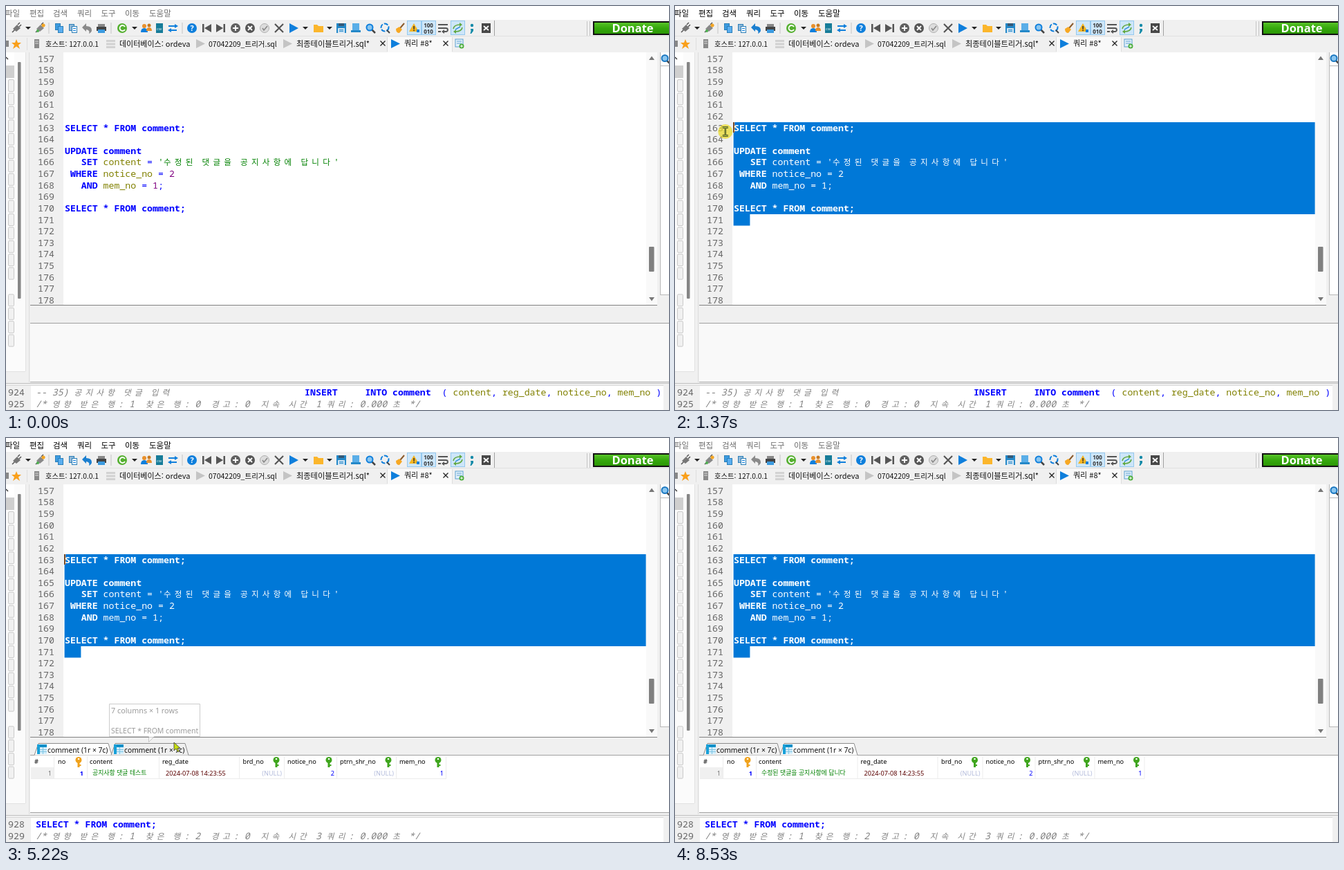
Recreate the animation shown at these times as an HTML page. Size 959 px wide and 584 px high, loop 8.59 s.

```html
<!DOCTYPE html>
<html lang="ko">
<head>
<meta charset="utf-8">
<title>SQL editor</title>
<style>
html, body { margin: 0; width: 100%; height: 100%; overflow: hidden; background: #f0f0f0; }
svg { display: block; width: 959px; height: 584px; }
text { white-space: pre; font-family: "Noto Sans", "Noto Sans CJK KR", "Noto Sans CJK", sans-serif; }
.m { font: 13.23px "Noto Sans Mono", "DejaVu Sans Mono", monospace; }
.h { font: 11.6px "Noto Sans CJK KR", "Noto Sans CJK", sans-serif; }
.ko { font-family: "Noto Sans CJK KR", "Noto Sans CJK", sans-serif; }
.k { fill: #0000ff; font-weight: bold; }
.o { fill: #0000ff; }
.i { fill: #808000; }
.s { fill: #008000; }
.n { fill: #800080; }
.c { fill: #808080; font-style: italic; }
.g { fill: #666; }
.white text { fill: #fff; }
</style>
</head>
<body>
<svg id="stage" viewBox="0 0 959 584"></svg>
<script>
const LOOP = 8590, CW = 7.94, LH = 16.62, X0 = 85;

const rect = (x, y, w, h, f, more = '') => `<rect x="${x}" y="${y}" width="${w}" height="${h}" fill="${f}" ${more}/>`;
const circ = (x, y, r, f, more = '') => `<circle cx="${x}" cy="${y}" r="${r}" fill="${f}" ${more}/>`;
const fill = (d, f) => `<path d="${d}" fill="${f}"/>`;
const line = (d, s, w = 1) => `<path d="${d}" fill="none" stroke="${s}" stroke-width="${w}"/>`;
const text = (x, y, s, size, f = '#000', more = '') => `<text x="${x}" y="${y}" font-size="${size}" fill="${f}" ${more}>${s}</text>`;
const group = (id, s, more = '') => `<g id="${id}" ${more}>${s}</g>`;
const END = 'text-anchor="end"';

// Text on a character grid; Hangul takes two cells.
const isKo = ch => /[가-힣]/.test(ch);
const cellCount = s => [...s].reduce((n, ch) => n + (isKo(ch) ? 2 : 1), 0);
function cells(x, y, s, cls) {
  let col = 0;
  return s.match(/[가-힣]+|[^가-힣]+/g).map(run => {
    const ko = isKo(run[0]);
    const xs = [...run].map(() => { const p = x + col * CW; col += ko ? 2 : 1; return p.toFixed(1); });
    return `<text class="${ko ? 'h' : 'm'} ${cls}" x="${xs.join(' ')}" y="${y}">${run}</text>`;
  }).join('');
}
function runs(x, y, parts) {
  let col = 0;
  return parts.map(([cls, s]) => {
    const out = cells(x + col * CW, y, s, cls);
    col += cellCount(s);
    return out;
  }).join('');
}

const TOP = 68.25;
const rowTop = n => TOP + (n - 157) * LH;
const baseline = n => (80.8 + (n - 157) * LH).toFixed(1);

const select = [['k', 'SELECT * FROM comment;']];
const code = {
  163: select,
  165: [['k', 'UPDATE comment']],
  166: [['k', '   SET '], ['i', 'content'], ['o', ' = '], ['s', "'수정된 댓글을 공지사항에 답니다'"]],
  167: [['k', ' WHERE '], ['i', 'notice_no'], ['o', ' = '], ['n', '2']],
  168: [['k', '   AND '], ['i', 'mem_no'], ['o', ' = '], ['n', '1'], ['o', ';']],
  170: select,
  171: [['o', '   ']]
};
const rowLength = n => (code[n] || []).reduce((sum, p) => sum + cellCount(p[1]), 0);
const codeText = Object.keys(code).map(n => runs(X0, baseline(n), code[n])).join('');

function toolbar() {
  const B = '#0f7fdc', D = '#555', out = [];
  const add = (...s) => out.push(...s);
  const drop = x => fill(`M${x - 4} 30h8l-4 4z`, '#222');
  const sep = x => line(`M${x} 24v16`, '#c4c4c4');
  const plug = (x, c) => line(`M${x - 6} 38l4-4M${x + 2} 27l3-3M${x + 4} 30l3-3`, D, 1.5) + fill(`M${x - 5} 33l6-6 5 5-6 5z`, c);
  const sheet = (x, y, c) => rect(x, y, 7, 9, c, 'stroke="#2c7fb8"');
  add(plug(15, '#777'), drop(32), plug(49, '#888'), circ(54, 28, 2.5, '#f5a623'), circ(46, 36, 2, '#4caf50'), sep(62));
  add(sheet(71.5, 25.5, '#3c9be0'), sheet(75.5, 29.5, '#5aaef0'), sheet(91.5, 26.5, '#8fb8d8'), sheet(95.5, 29.5, '#fff'), line('M97 32.5h4M97 35.5h4', B));
  add(`<path id="undo" d="M110 31l6-6v4q8 0 8 6 0 3-4 5 2-5-4-6v3z"/>`);
  add(rect(133, 26, 10, 4, '#888'), rect(131, 30, 14, 6, '#444'), rect(133, 34, 10, 5, '#3c9be0'), sep(152));
  add(circ(168, 32, 7, '#55b030'), line('M172 30a4 4 0 1 0 0 4', '#fff', 1.8), drop(186));
  add(circ(200, 29, 3, '#e8912d'), fill('M195 38q0-6 5-6t5 6z', B), circ(207, 28, 2.5, '#c97a20'), fill('M203 36q0-5 4-5t4 5z', '#e8912d'));
  add(rect(217, 25, 10, 14, '#167c99'), text(218, 35, 'csv', 5, '#fff'), line('M235 29h11M236 35h11', B, 2), fill('M244 26l5 3-5 3z', B), fill('M239 32l-5 3 5 3z', B), sep(255));
  add(circ(269, 32, 7, B), text(269, 36, '?', 11, '#fff', 'text-anchor="middle" font-weight="bold"'));
  add(rect(284, 26, 2.5, 12, D), fill('M297 26v12l-10-6z', D), rect(314.5, 26, 2.5, 12, D), fill('M304 26v12l10-6z', D));
  add(circ(332, 32, 7, '#606060'), line('M328 32h8M332 28v8', '#fff', 2), circ(353, 32, 7, D), line('M350 29l6 6M356 29l-6 6', '#fff', 2));
  add(circ(374, 32, 6.5, '#ddd', 'stroke="#b0b0b0"'), line('M371 32l2 3 5-6', '#888', 1.6), line('M389 26l12 12M401 26l-12 12', D, 2.2));
  add(fill('M410 25v14l13-7z', B), drop(433), fill('M445 27h5l2 2h7v9h-14z', '#fbb62c'), drop(468));
  add(rect(478, 25, 14, 14, '#2488c8'), rect(481, 25, 8, 4, '#355a78'), rect(480, 32, 10, 7, '#cfe4f4'), line('M482 34.5h6M482 36.5h6', '#2488c8'));
  add(rect(501, 25, 10, 11, '#5aaee8'), rect(499, 35, 14, 3, '#2488c8'));
  add(line('M529 34l5 5', '#444', 2.5), circ(526, 31, 4.5, '#8ac6f0', `stroke="${B}" stroke-width="2"`));
  add(`<circle cx="548" cy="31" r="5.5" fill="none" stroke="${B}" stroke-width="2" stroke-dasharray="6 2"/>`, line('M551 35l4 4', '#444', 2));
  add(line('M576 25l-6 7', '#8a5a2b', 2), fill('M564 33l5-3 4 4-4 5q-5 0-5-6z', '#f7a823'));
  for (const x of [580, 601, 643]) add(rect(x + .5, 21.5, 20, 20, '#cde6f9', 'stroke="#94c8ee"'));
  add(fill('M590 25l7 12h-14z', '#f6b521'), rect(589.3, 29, 1.6, 4.5, '#333'), rect(589.3, 34.5, 1.6, 1.6, '#333'), rect(594, 34, 4, 4, B));
  for (const [y, s] of [[31, '100'], [39.5, '010']]) add(text(611, y, s, 8, '#333', 'text-anchor="middle" font-weight="bold"'));
  add(line('M625 27h14M625 32h11q3 0 3 2.5t-3 2.5h-4M625 37h4', D, 1.8), fill('M634 34v6l-4-3z', D));
  add(line('M647 33q1-6 10-6M660 31q-1 6-10 6', '#62a840', 1.6), fill('M656 24l4 3-4 3z', '#62a840'), fill('M651 34l-4 3 4 3z', '#62a840'), line('M650 34l7-4', B, 1.3));
  add(circ(674, 28, 2.2, '#128aa8'), fill('M672 33h4v3l-3 4h-1.5l1-4z', '#128aa8'));
  add(rect(688, 25, 13, 14, '#484848'), line('M691 29l7 6M698 29l-7 6', '#fff', 1.8), line('M706.5 21v22', '#a0a0a0'));
  return out.join('');
}

function tabBar() {
  const close = x => line(`M${x - 3.5} 50.5l7 7M${x + 3.5} 50.5l-7 7`, '#222', 1.3);
  const play = (x, c) => fill(`M${x - 6} 48v13l13-6.5z`, c);
  const ko = 'class="ko"';
  return rect(552, 45, 93, 22, '#f9f9f9') + line('M551.5 45v21M645.5 45v21', '#ddd')
    + rect(0, 50, 4, 9, '#888') + fill('M15 48l2 5h5l-4 3.5 2 5.5-5-3.5-5 3.5 2-5.5-4-3.5h5z', '#f9a01b') + line('M30.5 46v18', '#ddd')
    + rect(41, 48, 7, 13, '#8a8a8a') + line('M42 51h5M42 54h5', '#ddd')
    + rect(145, 49, 13, 3, '#d2d2d2') + rect(145, 53.5, 13, 3, '#d2d2d2') + rect(145, 58, 13, 3, '#d2d2d2')
    + text(57, 59, '호스트: 127.0.0.1', 10.3, '#111', ko)
    + text(164, 59, '데이터베이스: ordeva', 11, '#111', ko)
    + play(281, '#c4c4c4') + text(293, 59, '07042209_트리거.sql', 10.5, '#111', ko)
    + play(407, '#c4c4c4') + text(420, 59, '최종테이블트리거.sql*', 11.2, '#111', ko) + close(545)
    + play(563, '#0f7fdc') + text(576, 57.5, '쿼리 #8*', 11, '#111', ko) + close(636)
    + rect(650, 48, 11, 11, '#e4f1fb', 'stroke="#5b9fd0"') + line('M652 51h7M652 54h7', '#5b9fd0') + circ(659, 58, 3.5, '#4cae3c') + line('M657 58h4M659 56v4', '#fff');
}

function leftPanel() {
  let s = rect(0, 67, 28, 461, '#fbfbfb') + rect(0, 67, 12, 19, '#fff') + line('M0 74l3 3', '#333', 1.3) + rect(0, 86, 12, 18, '#cfcfcf');
  for (let i = 0; i < 20; i++) if (i !== 15) {
    s += rect(3.5, 106.5 + i * 19.4, 8, 17, '#f1f1f1', 'rx="1.5" stroke="#c9c9c9"');
  }
  return s + rect(17, 81, 4.5, 342, '#868686', 'rx="1"') + line('M28.5 67v461M0 528.5h28', '#e2e2e2') + line('M33.5 67v477', '#dcdcdc');
}

function editor() {
  let s = rect(83, 67, 843, 365, '#fff') + rect(35, 67, 48, 365, '#f0f0f0');
  for (let n = 157; n <= 178; n++) s += cells(46, baseline(n), String(n), 'g');
  return s + rect(926, 67, 16, 365, '#f9f9f9') + fill('M930 78h8l-4-5.5z', '#777') + fill('M930 421h8l-4 5.5z', '#777')
    + rect(930, 348, 7.5, 36, '#808080', 'rx="1"')
    + rect(947, 67, 12, 350, '#fff') + line('M946.5 67v351M947 86.5h12M947 417.5h12', '#b8b8b8')
    + line('M956 79l4 4', '#444', 2.5) + circ(953, 75.5, 4.5, '#8ac6f0', 'stroke="#1c78c0" stroke-width="2"');
}

function resultTab(x, active) {
  const w = 111;
  return `<path d="M${x} 458.5l6-17h${w - 10}l5 17" fill="${active ? '#fff' : '#f0f0f0'}" stroke="#8c8c8c"/>`
    + rect(x + 4, 443, 14, 14, '#d5eefa') + rect(x + 4, 443, 14, 4, '#0d8fc8') + rect(x + 4, 443, 4, 14, '#18a0d8')
    + line(`M${x + 8} 450.5h10M${x + 8} 453.5h10M${x + 12.5} 447v10`, '#7cc4e4')
    + text(x + 19, 455, 'comment (1r × 7c)', 10.3, '#111');
}

// Result grid; `shift` widens the content column.
function grid(active, content, shift) {
  const key = (x, c) => circ(x, 465.5, 4.5, c) + rect(x - 1.5, 468, 3, 8, c) + rect(x, 472, 3.5, 2, c) + circ(x, 464, 1.3, '#fff');
  const cell = (x, s, f, more = END) => text(x, 487.5, s, 9.2, f, more);
  const head = (x, s) => text(x, 470.5, s, 9.2);
  const rules = (...xs) => xs.map(x => line(`M${x + .5} 460v32`, '#ececec')).join('');
  const green = '#3fa51d', pale = '#b4bcdc';
  const moved = head(226, 'reg_date') + head(342.5, 'brd_no') + head(407, 'notice_no') + head(483, 'ptrn_shr_no') + head(569, 'mem_no')
    + [391, 467, 553, 625].map(x => key(x, green)).join('') + rules(221, 337, 402, 478, 564, 636)
    + cell(231, '2024-07-08 14:23:55', '#5a0000', '') + cell(399, '(NULL)', pale) + cell(475, '2', '#00f')
    + cell(561, '(NULL)', pale) + cell(633, '1', '#00f');
  return resultTab(41, active === 0) + resultTab(152, active === 1)
    + rect(35, 459, 924, 82, '#fff') + rect(35, 541, 924, 3, '#f0f0f0') + line('M35 541.5h924', '#a0a0a0')
    + rect(36, 476, 33, 16, '#f0f0f0') + line(`M36 492.5h${601 + shift}`, '#ececec') + rules(69, 117)
    + head(41, '#') + head(75, 'no') + key(105, '#f0a21c') + head(121, 'content')
    + cell(66, '1', '#777') + cell(112, '1', '#00f', END + ' font-weight="bold"')
    + text(125, 487, content, 8.9, '#008000', 'class="ko"') + `<g transform="translate(${shift} 0)">${moved}</g>`;
}

const stats = (found, queries) => [['c', `/* 영향 받은 행: 1  찾은 행: ${found}  경고: 0  지속 시간 ${queries} 쿼리: 0.000 초 */`]];
function log(first, top, bottom) {
  const y1 = 563, y2 = 580;
  return cells(3, y1, String(first), 'g') + cells(3, y2, String(first + 1), 'g') + runs(43, y1, top) + runs(43, y2, bottom);
}
const insertLine = [['c', '-- 35) 공지사항 댓글 입력' + ' '.repeat(24)], ['k', 'INSERT     INTO comment'], ['o', '  ( '],
  ['i', 'content'], ['o', ', '], ['i', 'reg_date'], ['o', ', '], ['i', 'notice_no'], ['o', ', '], ['i', 'mem_no'], ['o', ' )']];

const menu = [[-1, '파일'], [34, '편집'], [68, '검색'], [103, '쿼리'], [137.5, '도구'], [172, '이동'], [207, '도움말']]
  .map(([x, s]) => `<text class="ko" x="${x}" y="15" font-size="11.5">${s}</text>`).join('');

const beam = 'M-4 -6h8M0 -6v12M-4 6h8';
const stage = document.getElementById('stage');
stage.innerHTML = `<defs>
  <linearGradient id="green" x2="0" y2="1"><stop offset="0" stop-color="#5cc62c"/><stop offset=".5" stop-color="#35a80c"/><stop offset="1" stop-color="#2b9605"/></linearGradient>
  <clipPath id="selClip"><path id="selShape"/></clipPath></defs>`
  + rect(0, 0, 959, 584, '#f0f0f0') + rect(0, 0, 959, 20, '#fff') + group('menu', menu) + toolbar()
  + line('M0 43.5h959', '#e0e0e0') + line('M840.5 22v21M844.5 22v21', '#c4c4c4')
  + rect(850, 23, 112, 18, 'url(#green)', 'stroke="#111" stroke-width="2"')
  + text(906.5, 38, 'Donate', 16.5, '#fff', 'text-anchor="middle" font-weight="bold" style="font-family:\'Open Sans\',sans-serif"')
  + tabBar() + leftPanel() + editor() + codeText
  + `<path id="sel" fill="#0078d7"/>` + group('selText', codeText, 'class="white" clip-path="url(#selClip)"')
  + group('caret', rect(-1, 0, 1, 15, '#222') + rect(0, 0, 1, 15, '#ff8728'))
  + line('M35 432.5h907', '#828282') + line('M35 458.5h924', '#a0a0a0')
  + rect(35, 459, 924, 84, '#f9f9f9') + line('M35 543.5h924', '#b0b0b0')
  + group('gridA', grid(0, '공지사항 댓글 테스트', 0)) + group('gridB', grid(1, '수정된 댓글을 공지사항에 답니다', 42.5))
  + line('M0 545.5h959', '#c0c0c0') + rect(36, 549, 915, 35, '#fff') + line('M0 548.5h951', '#d8d8d8')
  + group('logA', log(924, insertLine, stats(0, 1))) + group('logB', log(928, select, stats(2, 3)))
  + group('tip', `<path d="M149.5 384.5h131v47h-66l-8 8v-8h-57z" fill="#fff" stroke="#a8a8a8"/>`
    + text(152, 398, '7 columns × 1 rows', 10.8, '#575757') + text(152, 427, 'SELECT * FROM comment', 10.5, '#575757'))
  + group('pointer', group('press', circ(0, 0, 10.5, '#e8d820', 'opacity=".7"'))
    + group('beam', line(beam, '#222', 2.4) + line(beam, '#b9d43c', 1))
    + group('arrow', `<path d="M0 0v12l3-3 2.5 5 2-1-2.3-4.5h4z" fill="#c6de10" stroke="#444" stroke-width=".9"/>`));

const el = id => document.getElementById(id);
const show = (id, on) => el(id).setAttribute('display', on ? 'inline' : 'none');
const move = (id, x, y) => el(id).setAttribute('transform', `translate(${x} ${y})`);
const within = (t, a, b) => t >= a && t < b;

// Pointer path: time, x, y
const track = [[70, 952, 470], [350, 620, 395], [600, 285, 309], [740, 270, 288], [950, 270, 288], [1160, 122, 219],
  [1430, 59, 171], [1700, 59, 171], [1980, 341, 255], [3380, 341, 255], [4190, 247, 412], [4260, 247, 412],
  [4610, 245, 429], [4940, 245, 431], [5220, 243, 440], [6090, 243, 440], [6860, 884, 551], [6930, 900, 576]];

function pointAt(t) {
  const i = track.findIndex(p => p[0] > t);
  if (i === 0) return track[0].slice(1);
  if (i < 0) return track[track.length - 1].slice(1);
  const [a, b] = [track[i - 1], track[i]];
  const u = (t - a[0]) / (b[0] - a[0]);
  return [a[1] + (b[1] - a[1]) * u, a[2] + (b[2] - a[2]) * u];
}

function caretOn(t) {
  if (t < 600 || t >= 8530) return false;
  if (t < 3490) return !within(t, 1980, 2510);
  return Math.floor((t - 3490) / 530) % 2 === 1;
}

function draw(t) {
  const active = within(t, 70, 8530);
  el('menu').setAttribute('fill', active ? '#000' : '#6d6d6d');
  el('undo').setAttribute('fill', active ? '#1b7fd0' : '#8a8a8a');

  // Selection runs from the drag position down to line 171.
  const [dx, dy] = pointAt(Math.min(t, 1430));
  const row = Math.min(171, Math.floor((dy - TOP) / LH) + 157);
  const col = Math.max(0, Math.min(rowLength(row), Math.round((dx - X0) / CW)));
  const left = X0 - .4, cx = left + col * CW;
  const d = t < 600 || row > 170 ? ''
    : `M${cx} ${rowTop(row)}H925.6V${rowTop(171)}H${left + 3 * CW}V${rowTop(172)}H${left}V${rowTop(row + 1)}H${cx}z`;
  el('sel').setAttribute('d', d);
  el('selShape').setAttribute('d', d);
  show('selText', d !== '');
  show('caret', caretOn(t));
  move('caret', Math.round(cx), Math.round(rowTop(row)));

  show('gridA', within(t, 2780, 5630));
  show('gridB', t >= 5630);
  show('logA', t < 2820);
  show('logB', t >= 2820);
  show('tip', within(t, 4940, 5630));
  el('tip').setAttribute('opacity', Math.max(0, Math.min(1, (t - 4940) / 480)));

  const [x, y] = pointAt(t);
  const overText = within(y, 67, 427) && x < 926 || y > 548;
  show('pointer', within(t, 70, 7000));
  move('pointer', x.toFixed(1), y.toFixed(1));
  show('press', within(t, 600, 1430) || within(t, 5560, 5700));
  show('beam', overText);
  show('arrow', !overText);
}

const start = performance.now();
function tick() {
  draw((performance.now() - start) % LOOP);
  requestAnimationFrame(tick);
}
tick();
</script>
</body>
</html>
```
